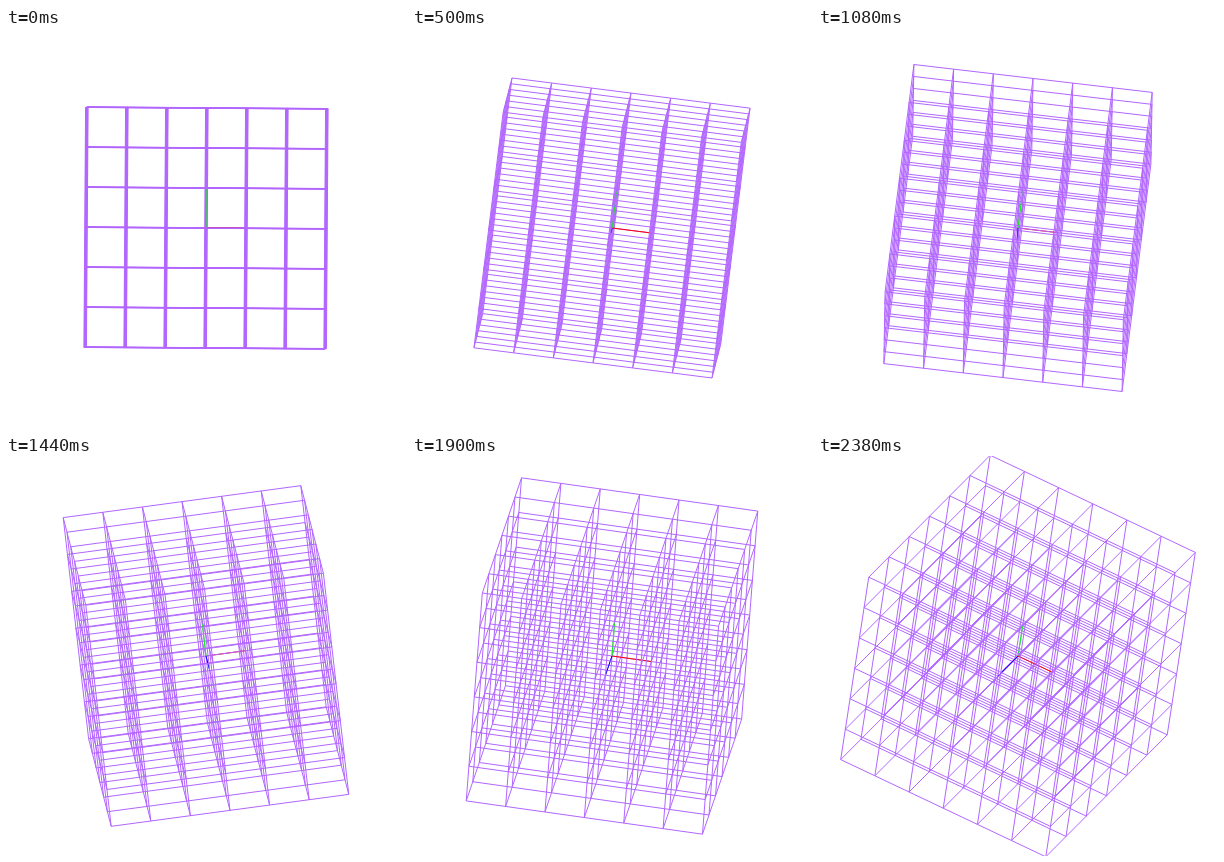
Animation, 400 px wide and 400 px high, one loop 2.4 s. Source, as an HTML page with a canvas:

```html
<!DOCTYPE html>
<html lang="en">
<head>
<meta charset="utf-8">
<title>Rotating lattice</title>
<style>
  html, body { margin: 0; width: 100%; height: 100%; overflow: hidden; background: #fff; }
  canvas { display: block; width: 400px; height: 400px; }
</style>
</head>
<body>
<canvas id="stage" width="400" height="400"></canvas>
<script>
const SIZE = 400, CENTER = 200, CELL = 40, HALF = 3;
const LOOP = 2400, STEP = 20;
const VIOLET = '#b266ff', RED = '#f00', GREEN = '#0f0', BLUE = '#00f';

// Time in ms, then Euler angles (x, y, z) in degrees
const POSES = [
  [0, 0.15, -0.6, -0.4],
  [500, 8.2, -2.1, -7],
  [840, 14.6, 2.7, -6.1],
  [1080, 17.4, -0.3, -6.9],
  [1440, 21.5, 5.4, 6.1],
  [1500, 22.3, 7.4, 6.6],
  [1900, 29.1, -9.4, -3.9],
  [2380, 36.1, -30.4, -7.8]
];

const ctx = document.getElementById('stage').getContext('2d');

// Segments in lattice units
const segments = [];
function addSegment(from, to, color) {
  segments.push({ from, to, color });
}
for (let i = -HALF; i <= HALF; i++) {
  for (let j = -HALF; j <= HALF; j++) {
    addSegment([-HALF, i, j], [HALF, i, j], VIOLET);
    addSegment([i, -HALF, j], [i, HALF, j], VIOLET);
    addSegment([i, j, -HALF], [i, j, HALF], VIOLET);
  }
}
addSegment([0, 0, 0], [1, 0, 0], RED);
addSegment([0, 0, 0], [0, 1, 0], GREEN);
addSegment([0, 0, 0], [0, 0, 1], BLUE);

function slope(i, k) {
  const p = POSES[Math.max(i - 1, 0)], q = POSES[Math.min(i + 1, POSES.length - 1)];
  return (q[k] - p[k]) / (q[0] - p[0]);
}

// Cubic Hermite interpolation through the poses
function anglesAt(time) {
  let i = 0;
  while (i < POSES.length - 2 && time >= POSES[i + 1][0]) i++;
  const p = POSES[i], q = POSES[i + 1], span = q[0] - p[0];
  const u = Math.min((time - p[0]) / span, 1), v = 1 - u;
  return [1, 2, 3].map(k => {
    const value = v * v * (1 + 2 * u) * p[k] + u * u * (3 - 2 * u) * q[k]
      + span * u * v * (v * slope(i, k) - u * slope(i + 1, k));
    return value * Math.PI / 180;
  });
}

function projector([a, b, c]) {
  const { sin, cos } = Math;
  const sa = sin(a), ca = cos(a), sb = sin(b), cb = cos(b), sc = sin(c), cc = cos(c);
  return ([x, y, z]) => [
    CENTER + CELL * (cb * cc * x - cb * sc * y + sb * z),
    CENTER - CELL * ((ca * sc + sa * sb * cc) * x + (ca * cc - sa * sb * sc) * y - sa * cb * z),
    CELL * ((sa * sc - ca * sb * cc) * x + (sa * cc + ca * sb * sc) * y + ca * cb * z)
  ];
}

function draw(time) {
  const project = projector(anglesAt(time));
  ctx.fillStyle = '#fff';
  ctx.fillRect(0, 0, SIZE, SIZE);
  ctx.lineWidth = 1;

  // Far segments first; an axis sits just above the lattice line it lies on
  const sorted = segments.map(({ from, to, color }) => {
    const p = project(from), q = project(to);
    const bias = color === VIOLET ? 0 : 1e-3;
    return { p, q, color, depth: (p[2] + q[2]) / 2 + bias };
  }).sort((s, t) => s.depth - t.depth);

  for (const { p, q, color } of sorted) {
    ctx.strokeStyle = color;
    ctx.beginPath();
    ctx.moveTo(p[0], p[1]);
    ctx.lineTo(q[0], q[1]);
    ctx.stroke();
  }
}

const start = performance.now();
let shown = -1;

function tick() {
  const elapsed = (performance.now() - start) % LOOP;
  const time = Math.floor(elapsed / STEP) * STEP;
  if (time !== shown) draw(shown = time);
  requestAnimationFrame(tick);
}
tick();
</script>
</body>
</html>
```
